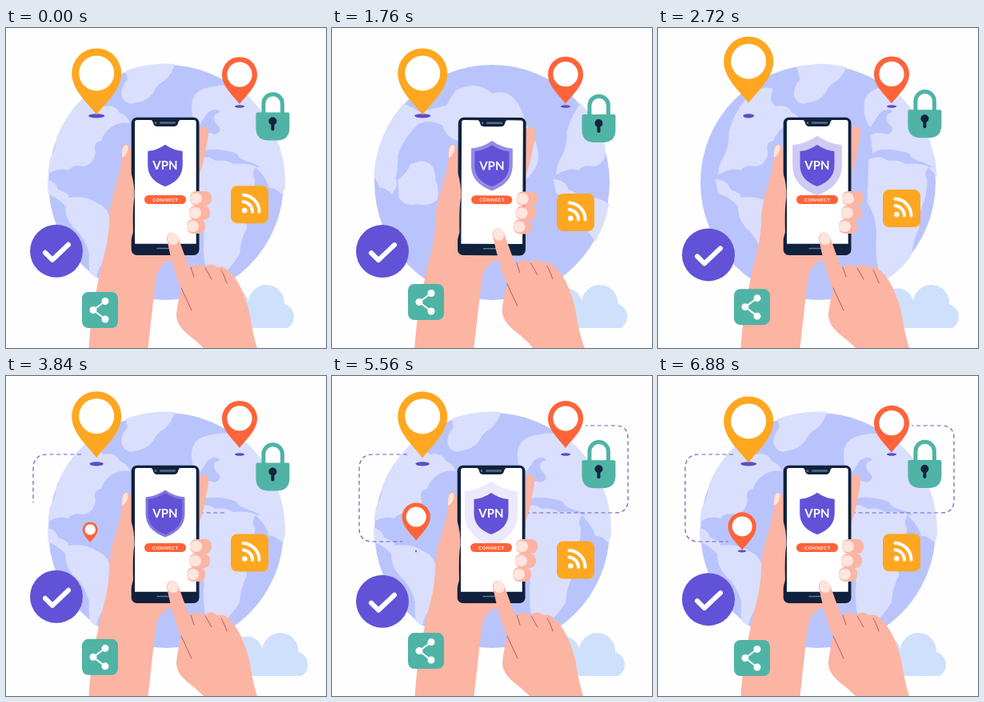
Write an HTML page that moves like this. It is 400x400 px and loops after 6920 ms.

```html
<!DOCTYPE html>
<html lang="en">
<head>
<meta charset="utf-8">
<title>VPN connect</title>
<style>
  html, body { margin: 0; width: 100%; height: 100%; overflow: hidden; background: #fefefe; }
  svg { display: block; width: 100%; height: 100%; }
  text { font-family: Lato, "Open Sans", sans-serif; font-weight: 700; fill: #fff; text-anchor: middle; }
  .skin { fill: #fcb4a3; }
  .nail { fill: #fee5de; }
  .crease { fill: none; stroke: #b3505a; stroke-width: .9; stroke-linecap: round; }
  .dash { fill: none; stroke: #6a5cc8; stroke-width: 1.2; stroke-dasharray: 5 3.6; }
  .reveal { fill: none; stroke: #fff; stroke-width: 6; }
  .white { fill: none; stroke: #fff; stroke-linecap: round; stroke-linejoin: round; }
  .shadow { fill: #5d4cc9; }
</style>
</head>
<body>
<svg viewBox="0 0 400 400">
  <defs>
    <clipPath id="disc"><circle cx="200.500" cy="193" r="148.500"/></clipPath>
    <path id="shield" d="M0 -26Q10 -19 21.500 -18V0Q21.500 18 0 26Q-21.500 18 -21.500 0V-18Q-10 -19 0 -26Z"/>
    <path id="pin" d="M0 52C-9 39 -31 22 -31 0A31 31 0 0 1 31 0C31 22 9 39 0 52ZM0 -22A22 22 0 0 0 0 22A22 22 0 0 0 0 -22Z"/>
    <path id="routeA" d="M94 98H52Q34 98 34 116V190Q34 207 51 207H88"/>
    <path id="routeB" d="M242 171H354Q370 171 370 155V78Q370 62 354 62H317"/>
    <mask id="maskA" maskUnits="userSpaceOnUse" x="0" y="0" width="400" height="400">
      <use id="revealA" href="#routeA" class="reveal"/>
    </mask>
    <mask id="maskB" maskUnits="userSpaceOnUse" x="0" y="0" width="400" height="400">
      <use id="revealB" href="#routeB" class="reveal"/>
    </mask>
    <g id="land">
      <path d="M50 184Q50 170 57 160Q64 148 63 130Q70 105 85 88Q105 70 118 76Q112 92 122 98Q137 95 142 106Q152 110 155 119Q142 117 133 123Q122 130 119 141Q108 142 112 156Q109 171 97 173Q83 170 78 178Q65 173 50 184Z"/>
      <path d="M148 48L152 64Q142 76 145 86Q150 97 160 94Q176 92 184 81Q188 71 198 66Q208 58 213 40Z"/>
      <path d="M46 189Q62 190 65 202Q80 207 78 212Q100 209 114 219Q130 225 131 245Q132 270 124 290Q113 300 111 325Q102 310 104 282Q99 262 84 249Q74 238 74 222Q62 210 50 207Z"/>
      <path d="M232 100Q231 82 247 76Q270 68 300 74Q345 85 380 105L412 97L424 78Q450 64 470 82Q500 72 512 120Q530 145 527 168Q520 185 505 195Q480 190 470 165Q440 150 427 141Q412 137 408 122Q392 113 378 120Q358 138 352 160Q352 178 349 188Q333 186 326 180Q318 172 306 168Q292 165 288 157Q275 152 262 152Q250 151 243 157L240 135Q246 128 261 133Q273 128 263 120Q255 108 268 105Q262 98 252 106L240 124Q232 114 232 100Z"/>
      <path d="M238 164Q252 158 262 166Q275 164 284 170Q300 168 313 173Q306 181 311 190Q311 209 305 222Q299 234 301 250Q293 264 292 283Q278 305 259 319Q246 306 247 268Q250 240 236 218Z"/>
      <path d="M312 174Q330 172 338 181Q352 180 350 198L345 208Q335 198 329 200Q326 187 312 174Z"/>
      <path d="M352 190Q365 180 367 171Q383 163 391 169Q399 175 399 190Q405 204 401 215Q390 224 376 220Q361 224 353 212Z"/>
    </g>
  </defs>

  <circle cx="200" cy="193" r="147" fill="#bac4fc"/>
  <g clip-path="url(#disc)"><g id="map" fill="#dadffe">
    <use href="#land" x="-500"/><use href="#land"/><use href="#land" x="500"/>
  </g></g>

  <path id="cloud" fill="#cfe0fd" d="M265 375A12 12 0 0 1 263 351A20 20 0 0 1 303 341A22.600 22.600 0 0 1 348 345A16.500 16.500 0 0 1 352 375Z"/>

  <g mask="url(#maskA)"><use href="#routeA" class="dash"/></g>
  <g mask="url(#maskB)"><use href="#routeB" class="dash"/></g>

  <ellipse id="yellowShadow" class="shadow" cx="113.200" cy="109.800" rx="10" ry="2.600"/>
  <g id="yellow"><circle r="25" fill="#fff"/><use href="#pin" fill="#ffa720"/></g>
  <ellipse class="shadow" cx="292" cy="98" rx="6" ry="1.700"/>
  <g id="red"><circle r="25" fill="#fff"/><use href="#pin" fill="#ff6339"/></g>
  <ellipse id="smallShadow" class="shadow" cx="105" cy="219" ry="1.400"/>
  <g id="small"><circle r="25" fill="#fff"/><use href="#pin" fill="#ff6339"/></g>

  <g id="check">
    <circle cx="63" r="33" fill="#6252d7"/>
    <path class="white" stroke-width="6" d="M49 2L58 11L78 -8"/>
  </g>

  <g id="lock">
    <path fill="none" stroke="#4fb4a5" stroke-width="5" d="M321.500 26V14A11.750 11.750 0 0 1 345 14V26"/>
    <path fill="#4fb4a5" d="M314 25H352Q354 25 354 27V44Q354 60 338 60H328Q312 60 312 44V27Q312 25 314 25Z"/>
    <circle cx="333" cy="36" r="5" fill="#14233f"/>
    <path stroke="#14233f" stroke-width="4" stroke-linecap="round" d="M333 38V46"/>
  </g>

  <g id="rss">
    <rect x="281" width="47" height="47" rx="8" fill="#ffa720"/>
    <circle cx="298.300" cy="31" r="3.300" fill="#fff"/>
    <path class="white" stroke-width="4" d="M296.500 20A12.500 12.500 0 0 1 308 32.500M296.500 11.500A21 21 0 0 1 316.500 32.500"/>
  </g>

  <g id="holder">
    <path class="skin" d="M95 435L103.500 400Q106 360 112 332Q118 300 126 270Q129 252 129 238Q130 220 135 205Q142 182 145 164L144 152Q147 144 153 146Q158 150 158 170L230 180L241 126Q247 121 252 125Q255 130 250 150Q247 170 242 182L236 276Q222 288 206 290Q191 293 187 315L177.500 400L174 435Z"/>
    <path class="nail" d="M145 159Q145 147 150 146Q154 147 152 153Q150 160 145 162Z"/>
    <rect x="156.700" y="111.700" width="84.800" height="172.300" rx="7" fill="#10213d"/>
    <path fill="#fff" d="M164 115H181Q183 115 184 119Q185 123 189 123H210Q214 123 215 119Q216 115 218 115H235Q237.700 115 237.700 118V269.700H161V118Q161 115 164 115Z"/>
    <circle cx="187" cy="118.500" r="1.500" fill="#566a86"/>
    <path stroke="#566a86" stroke-width="2.400" stroke-linecap="round" d="M193 118.500H211"/>
    <path stroke="#66758b" stroke-width="1.600" stroke-linecap="round" d="M189 275.500H205"/>
    <path class="skin" d="M156 180Q161 195 160.500 212Q158 225 159 255L155 270Z"/>
    <use id="ring" href="#shield" fill="#6252d7"/>
    <use href="#shield" x="199" y="172" fill="#6252d7"/>
    <text x="199" y="177.300" font-size="15">VPN</text>
    <g id="button">
      <rect x="-26" y="-5.500" width="52" height="11" rx="5.500" fill="#ff6339"/>
      <text x=".3" y="2.200" font-size="6" letter-spacing=".5">CONNECT</text>
    </g>
    <g id="fingers"></g>
  </g>

  <g id="tapper">
    <path class="skin" d="M201 264C201 253 213 253 216 264L229 300Q238 292 247 299Q256 292 264 299Q272 297 279 304Q291 316 297 333Q304 350 306 366Q309 385 314 400L333 447L340 480H285L273 447Q268 428 247 400Q237 390 226 382Q212 370 213 357Q215 340 219 327Q208 299 201 264Z"/>
    <path class="nail" d="M202 265C201 254 212 253 215 262Q217 270 210 271Q203 271 202 265Z"/>
    <path class="crease" d="M219 325L232 353M231 299L235 311M249 300Q252 305 257 314M269 303Q272 307 276 319"/>
  </g>

  <g id="share">
    <rect x="95" y="-22.500" width="45" height="45" rx="8" fill="#4fb4a5"/>
    <path class="white" stroke-width="2" d="M124 -11L109 0L124 11.500"/>
    <g fill="#fff"><circle cx="124" cy="-11" r="4.500"/><circle cx="109" r="4.500"/><circle cx="124" cy="11.500" r="4.500"/></g>
  </g>
</svg>
<script>
const LOOP = 6920, TAU = 2 * Math.PI;
const $ = id => document.getElementById(id);
const set = (id, attr, value) => $(id).setAttribute(attr, value);
const place = (id, x, y, scale = 1) => set(id, 'transform', `translate(${x} ${y}) scale(${scale})`);
const span = (t, from, to) => Math.min(1, Math.max(0, (t - from) / (to - from)));
const sine = v => (1 - Math.cos(Math.PI * v)) / 2;

// fingertips wrapped around the phone's right edge
$('fingers').innerHTML = [[230, 204, 27], [229, 222, 26], [226, 239, 23]].map(([x, y, w]) =>
  `<rect class="skin" x="${x}" y="${y}" width="${w}" height="18" rx="8"/>
   <rect class="nail" x="${x}" y="${y + 2}" width="15" height="14" rx="7"/>`).join('');

const lengths = { A: $('routeA').getTotalLength(), B: $('routeB').getTotalLength() };
function reveal(name, amount) {
  const style = $('reveal' + name).style;
  style.strokeDasharray = `${lengths[name] * amount} ${lengths[name] * 2}`;
  style.visibility = amount > 0 ? 'visible' : 'hidden';
}

function draw(t) {
  const p = t / LOOP;
  const wave = (cycles, shift = 0) => Math.cos(TAU * (cycles * p - shift));

  // floating items
  const lift = wave(4);
  place('yellow', 113.2, 48.7 + 7.8 * lift);
  set('yellowShadow', 'rx', 8.4 + 1.7 * lift);
  place('red', 292, 56.8 + 4.4 * wave(4, .8), .71);
  place('check', 0, 278.8 - 4.7 * wave(2, .25));
  place('lock', .4, 81.8 + 4.5 * wave(2, .3));
  place('rss', 0, 202 - 5 * wave(2, .04));
  place('share', 0, 347.5 + 5 * wave(2));
  place('cloud', 9 - 9 * wave(1), 0);

  // one tap on the button
  const press = t < 900 ? sine(t / 900) : 1 - sine(span(t, 900, 2000));
  set('holder', 'transform', `rotate(${2.47 * press} 150 350)`);
  place('tapper', -2.5 * press, -50 * press);
  place('button', 199, 214.5, 1 - .14 * press);

  // two shield pulses
  const pulse = (t - 900) / 2360;
  const phase = pulse < 0 || pulse >= 2 ? 0 : pulse % 1;
  place('ring', 199, 172, 1 + .56 * phase);
  set('ring', 'opacity', 1 - .9 * phase);

  // globe makes one turn, slowing down
  const rest = 1 - span(t, 1080, 3200);
  place('map', t < 1080 ? 0 : 500 * rest * rest, 0);

  // routes and the new location
  reveal('A', span(t, 3560, 4080));
  reveal('B', span(t, 3750, 4520));
  const grow = sine(span(t, 3600, 4060));
  const drop = wave(2);
  place('small', 105.2, 200 - 12 * grow - 6.7 * (1 - drop), .57 * grow);
  set('smallShadow', 'rx', span(t, 3900, 4200) * (2.8 + 2.4 * drop));
}

function tick() {
  draw(performance.now() % LOOP);
  requestAnimationFrame(tick);
}
tick();
</script>
</body>
</html>
```
